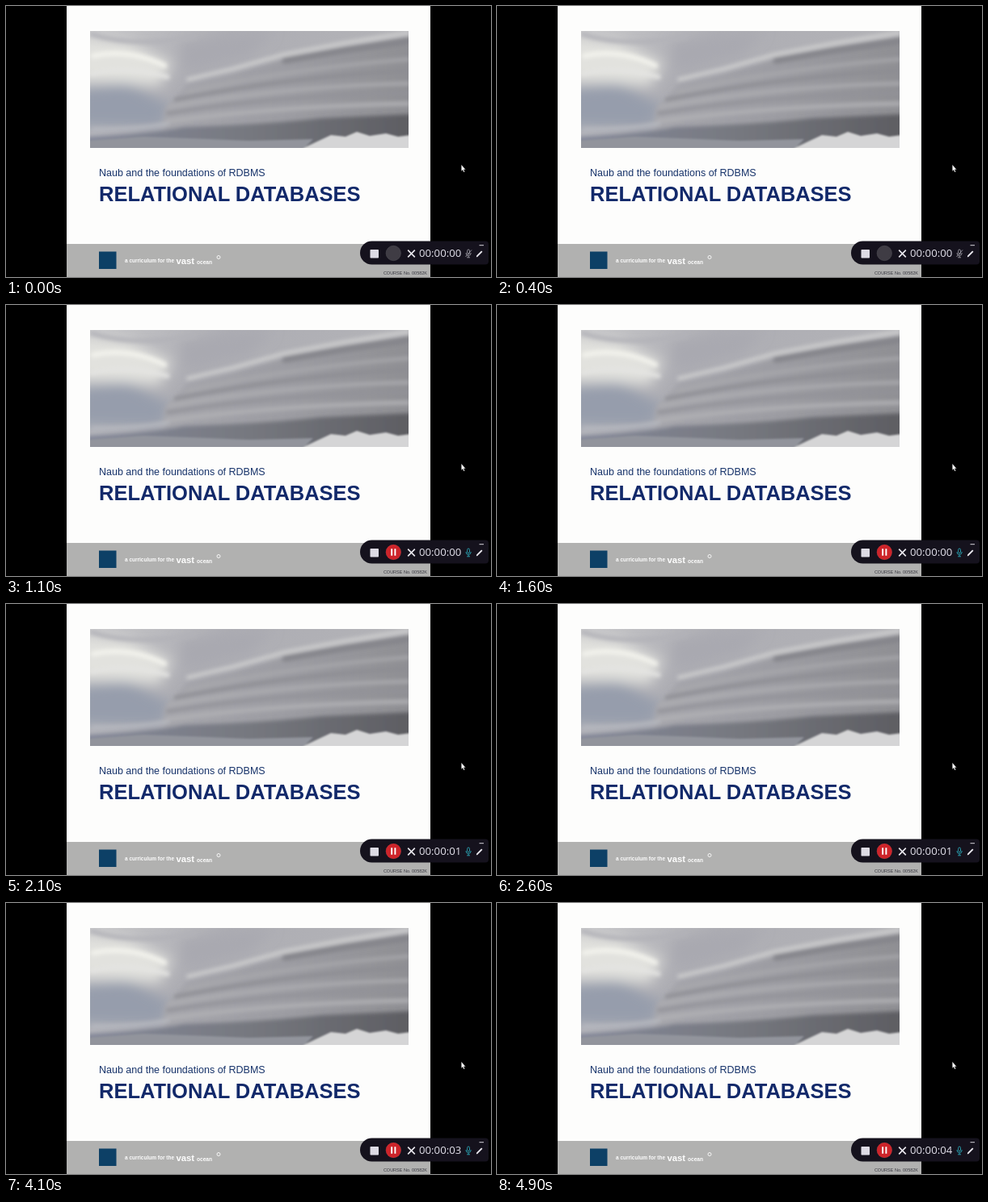
An HTML page for the animation above (5000 ms loop, 600x336 px).

```html
<!DOCTYPE html>
<html lang="en">
<head>
<meta charset="utf-8">
<title>Slide recording</title>
<style>
  html, body { margin: 0; width: 100%; height: 100%; overflow: hidden; background: #000; }
  svg { display: block; width: 600px; height: 336px; }
  text { font-family: "Liberation Sans", Arial, sans-serif; }
  .tag { font-weight: 700; fill: #fdfdfd; }
  #clock { font: 400 13.2px "Open Sans", "Noto Sans", sans-serif; fill: #e2e0ea; }
</style>
</head>
<body>
<svg viewBox="0 0 600 336">
  <defs>
    <clipPath id="frame"><rect x="104" y="31" width="394" height="145"/></clipPath>
    <filter id="soft" x="-30%" y="-60%" width="160%" height="220%"><feGaussianBlur stdDeviation="8"/></filter>
    <filter id="mid" x="-20%" y="-60%" width="140%" height="220%"><feGaussianBlur stdDeviation="2.5"/></filter>
    <filter id="fine" x="-10%" y="-30%" width="120%" height="160%"><feGaussianBlur stdDeviation="1"/></filter>
    <linearGradient id="sky" x2="1" y2=".3">
      <stop offset="0" stop-color="#c8c8ca"/>
      <stop offset=".4" stop-color="#adadb3"/>
      <stop offset="1" stop-color="#b4b4b8"/>
    </linearGradient>
    <linearGradient id="body" x2="1">
      <stop offset="0" stop-color="#a6a6ac"/>
      <stop offset=".5" stop-color="#9c9ca2"/>
      <stop offset="1" stop-color="#8e8e92"/>
    </linearGradient>
    <linearGradient id="shelf" x2="1">
      <stop offset="0" stop-color="#85899a"/>
      <stop offset=".5" stop-color="#76787f"/>
      <stop offset="1" stop-color="#5d5d62"/>
    </linearGradient>
  </defs>

  <rect width="600" height="336"/>
  <rect x="75" width="450" height="336" fill="#fdfdfc"/>
  <rect x="75" y="295" width="450" height="41" fill="#b1b1b0"/>

  <g clip-path="url(#frame)">
    <rect x="104" y="31" width="394" height="145" fill="url(#sky)"/>
    <g filter="url(#soft)">
      <path d="M90 40L150 45L205 70L190 98L90 92Z" fill="#e2e2de"/>
      <path d="M90 102L150 96L205 124L190 150H90Z" fill="#969dac"/>
      <path d="M215 45L330 31L300 62L220 82Z" fill="#a9a9b0"/>
    </g>
    <path d="M196 128L225 96L280 84L344 66L418 52L510 36V150L196 156Z" fill="url(#body)" filter="url(#mid)"/>
    <g filter="url(#mid)" fill="none" stroke-linecap="round">
      <path d="M108 62Q150 52 196 74" stroke="#f2f2ec" stroke-width="6"/>
      <path d="M106 84Q150 74 200 88" stroke="#e4e4e2" stroke-width="5"/>
      <path d="M106 35Q160 52 235 38" stroke="#b2b2b8" stroke-width="5"/>
      <path d="M225 91L280 78L344 60L418 46L498 33" stroke="#d0d0d0" stroke-width="4"/>
      <path d="M345 68L420 55L498 44" stroke="#85858b" stroke-width="7"/>
      <path d="M225 106Q350 78 498 66" stroke="#a8a8ac" stroke-width="4"/>
      <path d="M210 116Q350 88 498 80" stroke="#8c8c92" stroke-width="4"/>
      <path d="M202 125Q340 100 498 96" stroke="#adadb1" stroke-width="4"/>
      <path d="M200 133Q340 110 498 108" stroke="#929298" stroke-width="4"/>
      <path d="M200 143Q340 124 498 121" stroke="#b0b0b4" stroke-width="5"/>
      <path d="M108 153Q160 153 200 146" stroke="#b7b9c0" stroke-width="4"/>
    </g>
    <path d="M100 162Q180 158 220 150Q320 147 390 139L502 134V180H100Z" fill="url(#shelf)" filter="url(#mid)"/>
    <g filter="url(#fine)">
      <path d="M385 168L402 160L420 162L434 156L450 161L470 158L485 162L502 160V180H360Z" fill="#d5d5d6"/>
      <path d="M100 167L170 162L225 164L300 167L380 165L365 180H100Z" fill="#92949c"/>
    </g>
  </g>

  <text x="115" y="211" font-size="12.5" fill="#17336a">Naub and the foundations of RDBMS</text>
  <text x="115" y="242.3" font-size="25.48" font-weight="700" fill="#12296a">RELATIONAL DATABASES</text>

  <rect x="115" y="304.5" width="21.5" height="21.5" fill="#0d4066"/>
  <text class="tag" x="147" y="318" font-size="6.5">a curriculum for the</text>
  <text class="tag" x="210.5" y="320.3" font-size="11.3">vast</text>
  <text class="tag" x="236" y="319.5" font-size="6.6">ocean</text>
  <circle cx="263" cy="311.5" r="2" fill="none" stroke="#fdfdfd" stroke-width=".9"/>
  <text x="521" y="333" font-size="5.5" text-anchor="end" fill="#34343c">COURSE No. 00582K</text>

  <path d="M563.3 196.8V204.8L565 203.3L566.2 206L567.5 205.4L566.3 202.8H568.5Z" fill="#fff" stroke="#222" stroke-width=".3"/>

  <path d="M452.5 291.5H593Q597 291.5 597 295.5V316.5Q597 320.5 593 320.5H452.5A14.5 14.5 0 0 1 452.5 291.5Z" fill="#15121d"/>
  <rect x="450.5" y="302" width="10.5" height="10.5" rx=".8" fill="#dddbe4"/>
  <circle cx="479.3" cy="306.5" r="9.2" fill="#3f3c44" stroke="#504d54" stroke-width=".6"/>
  <g id="pause">
    <circle cx="479.3" cy="306.5" r="9.4" fill="#cd242a"/>
    <path d="M477.2 302.3V310.7M481.4 302.3V310.7" stroke="#fff" stroke-width="1.9"/>
  </g>
  <path d="M497.2 302.6L505.8 311.4M505.8 302.6L497.2 311.4" stroke="#eceaf0" stroke-width="1.6"/>
  <text id="clock" x="511" y="311.3"></text>
  <g id="mic" fill="none" stroke-width="1">
    <rect x="570.7" y="302" width="2.8" height="5.6" rx="1.4"/>
    <path d="M569 306Q569 309.5 572.1 309.5Q575.2 309.5 575.2 306M572.1 309.5V311.8M570.2 311.8H574"/>
    <path id="slash" d="M568.5 311L576 302.5"/>
  </g>
  <path d="M582.8 310.2L588.8 304.2" stroke="#eceaf0" stroke-width="1.9"/>
  <path d="M581.8 311.3L582.2 309.2L583.9 310.9Z" fill="#eceaf0"/>
  <path d="M585.5 296.7H591" stroke="#d5d3da" stroke-width="1"/>
</svg>
<script>
  const LOOP = 5000;
  const RECORD = 700;             // recording begins; the clock counts from here
  const FADE = { from: 650, to: 950 };
  const $ = id => document.getElementById(id);
  const pause = $("pause"), clock = $("clock"), mic = $("mic"), slash = $("slash");
  const clamp = v => Math.min(1, Math.max(0, v));

  function draw(t) {
    const live = t >= RECORD;
    const seconds = live ? Math.floor((t - RECORD) / 1000) : 0;
    clock.textContent = "00:00:0" + seconds;
    pause.setAttribute("opacity", clamp((t - FADE.from) / (FADE.to - FADE.from)));
    mic.setAttribute("stroke", live ? "#2899a8" : "#918f98");
    slash.setAttribute("visibility", live ? "hidden" : "visible");
  }

  const start = performance.now();
  function loop() {
    const elapsed = (performance.now() - start) % LOOP;
    draw(Math.floor(elapsed / 100) * 100);
    requestAnimationFrame(loop);
  }
  draw(0);
  requestAnimationFrame(loop);
</script>
</body>
</html>
```
